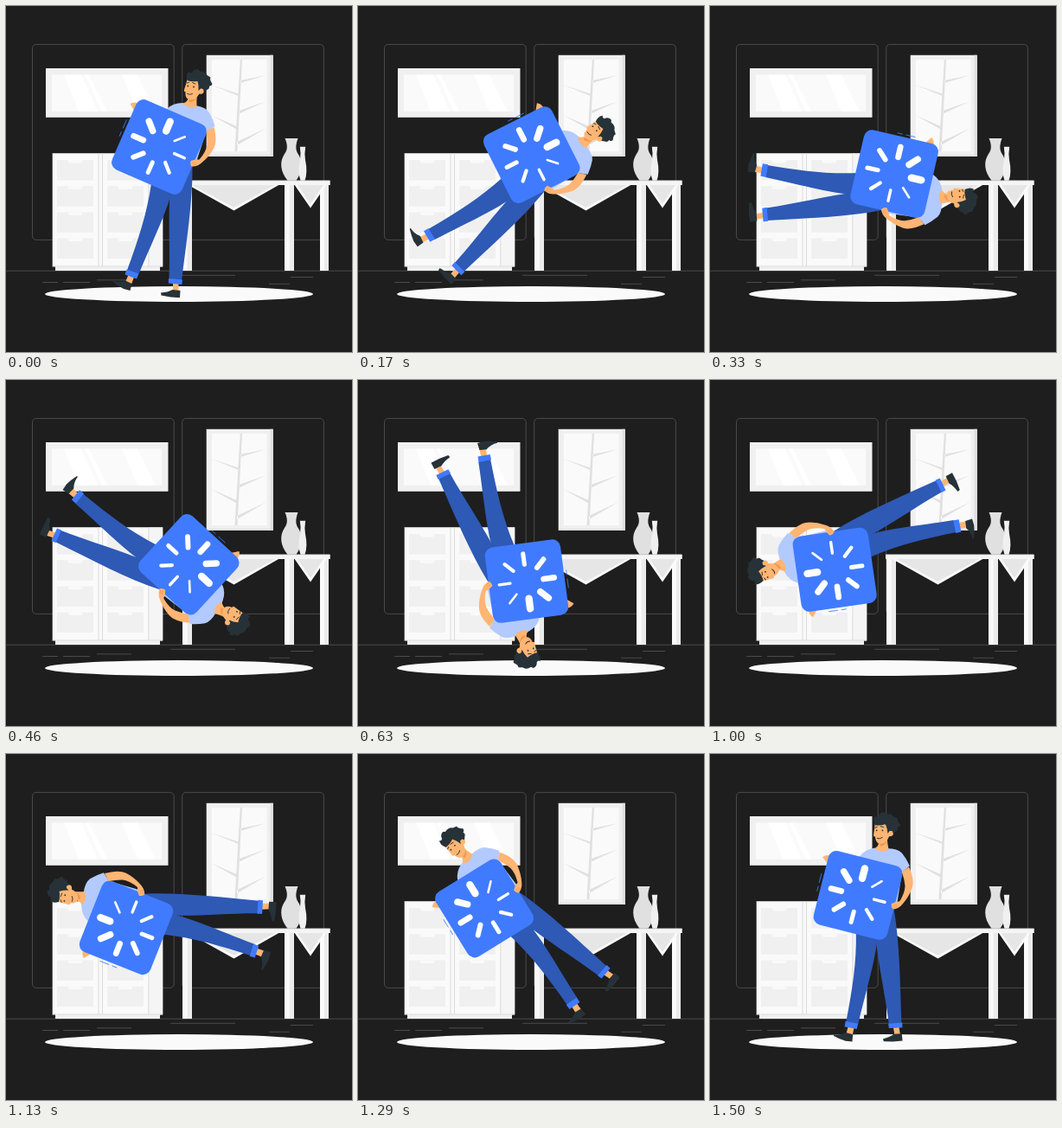
Animation, 400 px wide and 400 px high, one loop 1540 ms. Source, as an HTML page:

```html
<!DOCTYPE html>
<html lang="en">
<head>
<meta charset="utf-8">
<title>Spinning loader</title>
<style>
  html, body { margin: 0; height: 100%; overflow: hidden; background: #1e1e1e; }
  svg { display: block; width: 100vw; height: 100vh; }
  .outline { fill: none; stroke: #565656; stroke-width: .8; }
  .pale { fill: #fafafa; }
  .light { fill: #f0f0f0; }
  .grey { fill: #e0e0e0; }
  .skin { fill: #ffb573; }
  .dark { fill: #263238; }
  .blue { fill: #407bff; }
  .pants { fill: #2e59b5; }
  .shirt { fill: #b3caff; }
  .ink { fill: none; stroke: #263238; stroke-linecap: round; }
</style>
</head>
<body>
<svg viewBox="0 0 400 400">
  <rect width="400" height="400" fill="#1e1e1e"/>

  <!-- Walls and floor -->
  <g class="outline">
    <rect x="30.5" y="44.4" width="163.7" height="226" rx="4.5"/>
    <rect x="203.7" y="44.4" width="163.7" height="226" rx="4.5"/>
    <path d="M0 306.2H400M42 319.5H60M66 319.5H97M105 316.8H145M190 311.3H265M329 313.5H355M304 321.3H328"/>
  </g>
  <ellipse class="pale" cx="200" cy="333" rx="155" ry="9"/>

  <!-- Mirror -->
  <rect class="light" x="46" y="72" width="141.5" height="56.8"/>
  <rect class="pale" x="53" y="79.3" width="127" height="42.5"/>
  <path fill="#fff" d="M67 79.5H87L106 121.8H84ZM91 79.5H96L117 121.8H111ZM134 79.5H152L173 121.8H152Z"/>

  <!-- Painting -->
  <rect class="light" x="231.7" y="56.8" width="77" height="117.2"/>
  <path class="grey" d="M305.5 56.8H308.8V174H232V172H305.5Z"/>
  <rect class="pale" x="238" y="62" width="63.5" height="106"/>
  <path class="grey" d="M270.8 62H273L267.5 168H264.5ZM237 91L270 102V104.5ZM237 126L267.5 139.500V143ZM301 80L271 86V89ZM301 110L269.500 121V124.500ZM301.500 141L267 157V161Z"/>

  <!-- Cabinet -->
  <rect class="light" x="57" y="301" width="121" height="5"/>
  <rect class="pale" x="53.700" y="170.300" width="127.500" height="131"/>
  <rect x="165" y="170.300" width="16.200" height="131" fill="#f5f5f5"/>
  <path fill="none" stroke="#d4d4d4" stroke-width=".8" d="M53.700 170.700H181M107 170.500V301M111.500 170.500V301M164.800 171V301M53.700 301H181"/>
  <g id="drawers"></g>

  <!-- Table -->
  <path class="pale" d="M204 206H215V306H204ZM322 206H333V306H322ZM363 206H373V306H363Z"/>
  <path fill="#ebebeb" d="M209.500 206H215V306H209.500ZM327.500 206H333V306H327.500ZM368 206H373V306H368Z"/>
  <path class="pale" d="M209 206H317L263.500 236.500ZM333 206H371L352 233.500Z"/>
  <path fill="#e6e6e6" d="M215 207H311L263.500 233ZM337 207H367L352 229Z"/>
  <rect fill="#f5f5f5" x="203" y="201.800" width="171.500" height="5.200"/>
  <path fill="none" stroke="#d8d8d8" stroke-width=".7" d="M203 202H374.500V207"/>

  <!-- Vases -->
  <path class="grey" d="M322.500 153H337.500C335 160 334.500 165 337 170C343 178 344 190 335.500 201.800H325.500C317 191 316 180 322 171C326 166 325.500 160 322.500 153Z"/>
  <path class="light" d="M339.800 162.700H346.200Q344.800 171 346 178Q349 192 345.500 201.800H340.500Q336.500 191 340 178Q341.200 170 339.800 162.700Z"/>

  <!-- Person carrying the card -->
  <g id="person">
    <path class="skin" d="M138 319L141.500 311L148 313.500L144.500 323ZM193 319H199.500V331H193Z"/>
    <path class="dark" d="M123.500 317.500Q131 320 138 317.500L145.500 321L143.500 329L136 327Q130 324 123.500 319ZM179 331.500Q187 331 192.500 328L201.500 329L201 337.300L190 336.500L179.500 334.500Z"/>
    <path class="pants" d="M170 195L194 205C188 235 170 270 153.500 310L140 305.500C153 270 163 240 168 205Z"/>
    <path class="pants" d="M190 195L215.500 185C216 225 209 270 203 317.500L188.500 316C190 280 187 245 190 205Z"/>
    <path class="blue" d="M139.500 304.500L153.500 309.500L151 315.500L137.500 310.500ZM188 315L204 316.500L203.300 322L187.800 320.500Z"/>

    <path class="skin" d="M143.500 113Q147 110.500 152 112L158 116L150 124Z"/>
    <path class="shirt" d="M186 119Q193 112 204 112L219 115Q231 117 235 123Q239 130 241.500 139L231.500 145L220 180H185Z"/>

    <!-- Head -->
    <path class="skin" d="M212 101L221 102Q220 109 220.500 116.500Q211 120 205 112.500Q211 111 212 101Z"/>
    <path d="M212 108Q216 109 220.500 106Q217 112 211.500 111Z" fill="#f0994f"/>
    <path class="skin" d="M210 83Q208 91 205.800 97.500Q205.500 99 207.500 99.300Q207 105 209.500 107Q215 110 221 105L223.500 101.500Q228.500 102.500 229 98Q228.500 94 225 95L227 86L218 80Z"/>
    <path class="dark" d="M209.500 86Q207.500 79 211.500 75.500Q212 78 215 77Q217 72.500 222 73L224 75.500Q230 75 232.500 80L236.500 82.500Q235 85 238.500 90Q237.500 93 235 92.500Q235.500 96 232 97L228.500 99Q229 95 225 95.500L222.500 98Q223 92 221.500 87Q214 88 209.500 86Z"/>
    <path class="ink" stroke-width=".9" d="M209 89L211.500 88.500M215.500 88.500L219 90M209.500 101.500Q212.500 103.300 215.500 101.500"/>
    <circle class="dark" cx="210.300" cy="92.500" r=".9"/>
    <circle class="dark" cx="217" cy="93.500" r=".9"/>

    <!-- Card -->
    <g transform="translate(177 163) rotate(23.500)">
      <rect class="blue" x="-44" y="-44" width="88" height="88" rx="9.500"/>
      <path d="M-47 -14V-3M-47 1V7" stroke="#407bff" stroke-width=".8"/>
      <g id="spokes" stroke="#fff" stroke-linecap="round"></g>
    </g>

    <!-- Near arm -->
    <path class="skin" d="M231.500 144.500L240.500 140C243 150 243.500 159 240 165Q235 174 226.500 181Q221 186 214.500 185.500Q212.500 183 213.500 179Q218 177 223.500 177.500Q231 169 232.500 161Q233 153 231.500 144.500Z"/>
    <path d="M215 181.500L220 181M215.500 184L220 183" stroke="#e58f45" stroke-width=".5"/>
  </g>
</svg>
<script>
  const LOOP = 1540, STEPS = 37, PIVOT = "176.3 200.3";
  const byId = id => document.getElementById(id);
  const person = byId("person");

  let drawers = "";
  for (const x of [59, 117]) {
    for (let row = 0; row < 4; row++) {
      const y = 178 + row * 30.2;
      drawers += `<rect class="light" x="${x}" y="${y}" width="42" height="23.500"/>` +
        `<path class="pale" d="M${x + 12} ${y}h18l-2 3.500h-14z"/>`;
    }
  }
  byId("drawers").innerHTML = drawers;

  let spokes = "";
  for (let i = 0; i < 8; i++) {
    const width = 2.6 + i * 0.82;
    spokes += `<path d="M0 ${-18.5 - width / 5}V-32" stroke-width="${width}" transform="rotate(${(i + 1) * 45})"/>`;
  }
  byId("spokes").innerHTML = spokes;

  // The turn slows slightly in its last quarter.
  const angleAt = step => step <= 27 ? step * 9.93 : 360 - (STEPS - step) * 9.19;

  function draw(now) {
    const step = Math.min(STEPS - 1, Math.floor((now % LOOP) / LOOP * STEPS + 0.08));
    person.setAttribute("transform", `rotate(${angleAt(step)} ${PIVOT})`);
    requestAnimationFrame(draw);
  }
  draw(performance.now());
</script>
</body>
</html>
```
